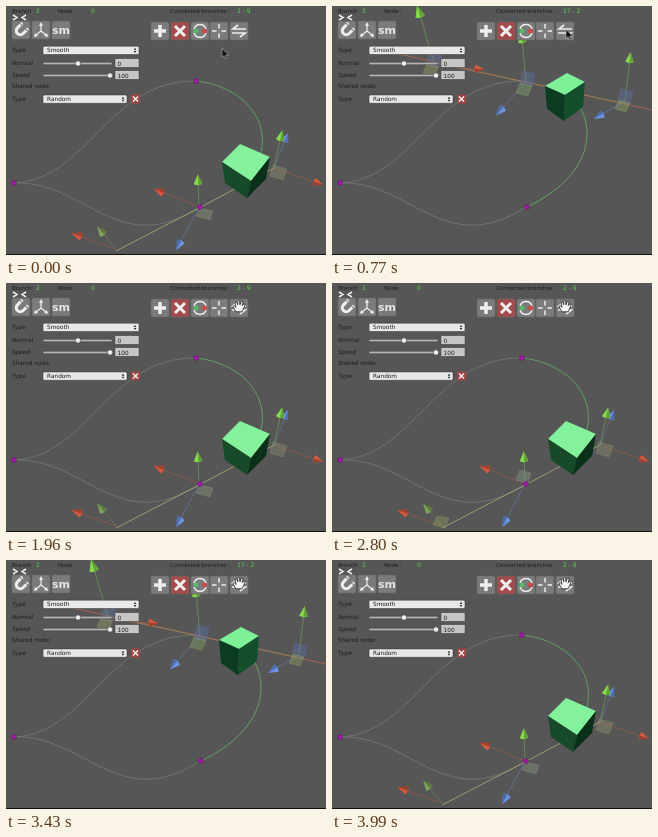
An HTML page for the animation above (4.27 s loop, 320 px wide and 249 px high).

```html
<!DOCTYPE html>
<html lang="en">
<head>
<meta charset="utf-8">
<title>Branch editor</title>
<style>
  html, body { margin: 0; width: 100%; height: 100%; overflow: hidden; background: #565656; }
  svg { display: block; width: 100vw; height: 100vh; }
  text { font-family: "DejaVu Sans", sans-serif; font-size: 5.8px; fill: #1d1d1d; }
  .header { font-size: 5.5px; }
  .value { font-size: 6px; fill: #55d84b; }
  .label { font-style: italic; }
  .icon { fill: none; stroke: #eee; }
</style>
</head>
<body>
<svg id="stage" viewBox="0 0 320 249" preserveAspectRatio="none">
  <rect width="320" height="249" fill="#565656"/>
  <g fill="none" stroke-width=".7" stroke="#7b8078">
    <path d="M8 177C82 174 102 74 190 75"/>
    <path d="M8 177C78 174 112 254 194 201"/>
  </g>
  <g id="sceneA"></g>
  <g id="sceneB"></g>
  <g id="panel"></g>
  <g id="ring" fill="none" stroke="#b5b5b5" stroke-width=".8">
    <circle id="outer" cx="234.5" cy="24"/>
    <circle id="inner" cx="234.5" cy="24"/>
  </g>
  <path id="arrow" d="M0 0V9L2.2 7.2L3.8 10.5L5.3 9.8L3.8 6.6H6.8Z" fill="#111" stroke="#bbb" stroke-width=".6"/>
  <path id="hand" transform="translate(226.5 16.5) scale(.88)" d="M4 14L1 9Q0 7 2 7L4 9L3 4Q3 2 5 3L6 6V2Q7 0 8 2L8.5 6L10 2Q12 1 12 3L11 7L13 5Q15 5 14 7L11 14Z" fill="#f5f5f5" stroke="#222" stroke-width=".9"/>
  <rect y="248" width="320" height="1" fill="#111"/>
</svg>
<script>
const $ = id => document.getElementById(id);
const poly = (points, fill, extra = '') => `<polygon points="${points}" fill="${fill}" ${extra}/>`;
const path = (d, stroke, width = .7) => `<path d="${d}" fill="none" stroke="${stroke}" stroke-width="${width}"/>`;
const rect = (x, y, w, h, fill, extra = '') => `<rect x="${x}" y="${y}" width="${w}" height="${h}" fill="${fill}" ${extra}/>`;
const text = (x, y, label, cls = '') => `<text x="${x}" y="${y}" class="${cls}">${label}</text>`;
const dot = (x, y, r, fill, extra = '') => `<circle cx="${x}" cy="${y}" r="${r}" fill="${fill}" ${extra}/>`;
const GREEN = '#84d94c', DULL_GREEN = '#7fa35a', RED = '#d2583f', BLUE = '#6a93e2';

// A handle axis ending in a cone that points away from its origin.
function axis(x, y, tx, ty, color, size = 1) {
  const angle = Math.atan2(ty - y, tx - x) * 180 / Math.PI;
  return `<g opacity=".65">${path(`M${x} ${y}L${tx} ${ty}`, color, .6)}</g>` +
    `<g transform="translate(${tx} ${ty}) rotate(${angle}) scale(${size})">` +
    `<path d="M6 0L-4 -4.4Q-6.5 0 -4 4.4Z" fill="${color}"/>` +
    poly('6,0 -4,4.4 -5,0', '#000', 'opacity=".25"') + '</g>';
}
const node = (x, y) => dot(x, y, 2.4, '#a51bad', 'stroke="#641269" stroke-width=".6"');
const plane = (points, color) => poly(points, color, `fill-opacity=".4" stroke="${color}" stroke-opacity=".7" stroke-width=".5"`);

function buildA() {
  return path('M190 75C230 79 264 108 255 147', '#5fa961', .9) +
    path('M110 245L194 201.5L268 162', '#acad78', .8) +
    axis(268, 162, 280, 132, BLUE, .9) + axis(268, 162, 275, 130, GREEN) + axis(268, 162, 312, 177, RED, .9) +
    plane('267,159 281,163 277,174 264,170', '#8b9474') +
    poly('216,156 234,138 264,151 245,175', '#84f29c') +
    poly('216,156 245,175 241,192 219,177', '#174a29') +
    poly('245,175 264,151 260,173 241,192', '#0a3019') +
    axis(193, 201, 192, 174, GREEN) + axis(193, 201, 153, 185, RED) + axis(193, 201, 173, 239, BLUE) +
    axis(110, 243, 95, 225, DULL_GREEN) + axis(110, 243, 71, 229, RED) +
    `<g id="early">${plane('194,202 207,205 204,214 190,210', '#8d9c7c')}</g>` +
    `<g id="settled">${plane('188,187 199,190 196,200 184,197', '#8d9c8c')}${plane('105,233 117,235 113,245 101,242', '#8fa260')}</g>` +
    node(8, 177) + node(190, 75) + node(194, 201) +
    text(85, 7, '0', 'header value') + text(231, 7, '2 - 9', 'header value');
}

function buildB() {
  return path('M67 48L320 104', '#b6684d', .8) + path('M104 57L290 97', '#9c9660', .5) +
    axis(103, 60, 87, 6, GREEN, 1.15) + axis(103, 60, 147, 63, RED, .9) +
    plane('98,46 110,49 106,62 94,59', '#6775a7') + plane('95,58 106,61 103,70 91,67', '#9aa466') +
    axis(194, 76, 190, 32, GREEN) + axis(194, 76, 168, 105, BLUE) +
    plane('191,65 203,68 200,81 188,78', '#6070b0') + plane('188,77 200,80 196,90 184,87', '#87a766') +
    axis(293, 95, 298, 52, GREEN) + axis(293, 95, 267, 110, BLUE) +
    plane('289,83 301,86 298,98 286,95', '#6070b0') + plane('287,94 298,97 294,106 283,103', '#92a463') +
    path('M246 98C263 123 261 169 195 201', '#68a968', .9) +
    poly('213,80 235,67 253,76 233,89', '#7df098') +
    poly('213,80 233,89 232,115 215,103', '#0b3b20') +
    poly('233,89 253,76 251,101 232,115', '#124f2a') +
    node(8, 177) + node(195, 201) +
    text(231, 7, '17 - 2', 'header value');
}

function dropdown(y, width, label) {
  const x = 37 + width - 4;
  return rect(37, y, width, 8.3, '#e8e8e8', 'rx="1.5" stroke="#333" stroke-width=".5"') +
    text(41, y + 6.2, label) + poly(`${x - 1.3},${y + 3.7} ${x + 1.3},${y + 3.7} ${x},${y + 1.7}`, '#222') +
    poly(`${x - 1.3},${y + 4.8} ${x + 1.3},${y + 4.8} ${x},${y + 6.8}`, '#222');
}
function slider(y, knob, value) {
  return rect(37, y - 1.2, 69, 2.4, '#b4b4b4', 'rx="1" stroke="#3c3c3c" stroke-width=".5"') +
    dot(knob, y, 2.7, '#eee', 'stroke="#333" stroke-width=".6"') +
    rect(109, y - 4.8, 24, 8.6, '#c6c6c6', 'stroke="#444" stroke-width=".5"') + text(111.5, y + 2, value);
}
function button(x, y, content, fill = '#7b7b7b') {
  return `<g transform="translate(${x} ${y})">` +
    rect(-9, -9, 18, 18, fill, 'rx="1.5" stroke="#686868" stroke-width=".6"') + content + '</g>';
}
const icon = (d, width = 2) => `<path class="icon" d="${d}" stroke-width="${width}"/>`;

function buildPanel() {
  const magnet = `<g transform="rotate(45)">${icon('M-4 -6V1A4 4 0 0 0 4 1V-6', 3)}${path('M-6 -4H-2M2 -4H6', '#777', 1)}</g>`;
  const tripod = icon('M0 1V-6M0 1L-5 5M0 1L5 5', 1.2) +
    poly('0,-8 -2,-4 2,-4', '#eee') + poly('-7,7 -6,3 -3,6', '#eee') + poly('7,7 6,3 3,6', '#eee');
  const swirl = icon('M-6 -2A6.3 6.3 0 0 1 6 -2M6 2A6.3 6.3 0 0 1 -6 2', 1.5) +
    dot(-4, 0, 2.5, '#55b86a') + dot(4.5, 0, 2.5, '#cb4a4a');
  return text(6, 7, 'Branch', 'header') + text(30, 7, '2', 'header value') +
    text(52, 7, 'Node :', 'header') + text(164, 7, 'Connected branches :', 'header') +
    path('M7 9L11 11.5L7 14M20 9L16 11.5L20 14', '#eee', 1.5) +
    button(15, 24, magnet) + button(35, 24, tripod) +
    button(55, 24, '<text y="3.5" text-anchor="middle" style="font-size:11px;font-weight:700;fill:#e4e4e4">sm</text>') +
    button(154, 25, icon('M-6 0H6M0 -6V6', 3.5)) +
    button(174, 25, icon('M-5 -5L5 5M5 -5L-5 5', 3), '#a34a4a') +
    button(194, 25, swirl) +
    button(213, 25, icon('M-7 0H-2.5M2.5 0H7M0 -7V-2.5M0 2.5V7', 1.5)) +
    button(233, 25, icon('M7 -2H-6L-1 -6M-7 2H6L1 6', 1.7)) +
    text(6, 46, 'Type', 'label') + dropdown(40.2, 96, 'Smooth') +
    text(6, 59, 'Normal', 'label') + slider(57.5, 72, '0') +
    text(6, 71, 'Speed', 'label') + slider(69.5, 104, '100') +
    text(6, 82, 'Shared node:') +
    text(6, 95, 'Type', 'label') + dropdown(89, 84, 'Random') +
    rect(125, 88.5, 9, 9, '#a04444', 'rx="1"') + path('M127 90.5L132 95.5M132 90.5L127 95.5', '#eee', 1.5);
}

$('sceneA').innerHTML = buildA();
$('sceneB').innerHTML = buildB();
$('panel').innerHTML = buildPanel();

const LOOP = 4270, STEP = 70, PRESS = 210;
const switches = [770, 1890, 3080, 3850];
const show = (id, visible) => $(id).setAttribute('visibility', visible ? 'inherit' : 'hidden');

function render(now) {
  const t = Math.floor((now % LOOP) / STEP) * STEP;
  const passed = switches.filter(s => t >= s).length;
  const press = switches.find(s => t >= s - PRESS && t < s);
  const pointing = t < switches[0] || switches.some(s => t >= s - PRESS && t < s + STEP);
  const p = Math.min(t / 560, 1);
  const ease = p * p * (3 - 2 * p);
  show('sceneA', passed % 2 === 0);
  show('sceneB', passed % 2 === 1);
  const settled = t - (passed ? switches[passed - 1] : 0) >= 420;
  show('settled', settled);
  show('early', !settled);
  show('arrow', pointing);
  show('hand', !pointing);
  $('arrow').setAttribute('transform', `translate(${216 + 18 * ease} ${42.5 - 19 * ease})`);
  show('ring', press !== undefined);
  if (press !== undefined) {
    const radius = 9 + (t - press + PRESS) / 35;
    $('outer').setAttribute('r', radius);
    $('inner').setAttribute('r', radius - 3);
  }
}

const start = performance.now();
function tick() {
  render(performance.now() - start);
  requestAnimationFrame(tick);
}
tick();
</script>
</body>
</html>
```
